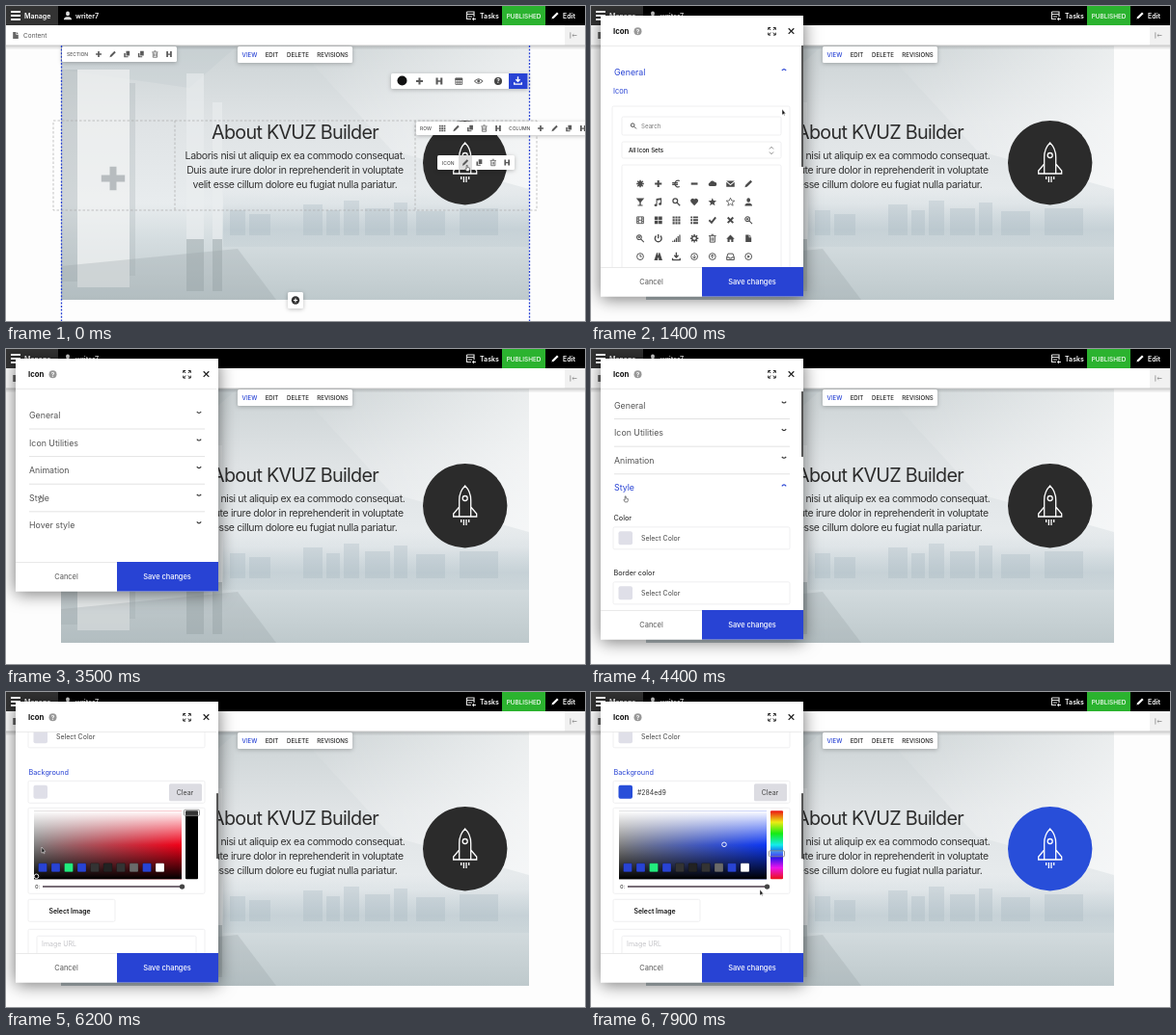
Animation, 600 px wide and 327 px high, one loop 8 s. Source, as an HTML page:

```html
<!DOCTYPE html>
<html lang="en">
<head>
<meta charset="utf-8">
<title>Icon settings</title>
<style>
  html, body { margin: 0; width: 100%; height: 100%; overflow: hidden; background: #fff; }
  #stage { display: block; width: 100vw; height: 100vh; font-family: Inter, "Liberation Sans", sans-serif; }
  #stage text { white-space: pre; }
  .bar { fill: #fff; filter: drop-shadow(0 1px 2px rgba(0,0,0,.25)); }
  .field { fill: #fff; stroke: #ebebed; stroke-width: .8; }
  #frame { fill: #fff; filter: drop-shadow(0 2px 9px rgba(0,0,0,.55)); }
</style>
</head>
<body>
<svg id="stage" viewBox="0 0 600 327" preserveAspectRatio="none"></svg>
<script>
const LOOP = 8000, BLUE = '#2843d4', PICKED = '#284ed9', DARK = '#2b2b2b', ROW = 28.6;

// ---- drawing helpers -------------------------------------------------
const rect = (x, y, w, h, fill, extra = '') =>
  `<rect x="${x}" y="${y}" width="${w}" height="${h}" fill="${fill}" ${extra}/>`;
const box = (x, y, w, h, cls) => `<rect class="${cls}" x="${x}" y="${y}" width="${w}" height="${h}" rx="1.5"/>`;
const text = (x, y, size, str, fill = '#333', extra = '') =>
  `<text x="${x}" y="${y}" font-size="${size}" fill="${fill}" ${extra}>${str}</text>`;
const line = (d, stroke, width = 1, extra = '') =>
  `<path d="${d}" fill="none" stroke="${stroke}" stroke-width="${width}" ${extra}/>`;
const ring = (x, y, r) => `M${x - r} ${y}a${r} ${r} 0 1 0 ${2 * r} 0a${r} ${r} 0 1 0 ${-2 * r} 0Z`;
const cells = (n, pitch, size) => Array.from({ length: n * n }, (_, i) =>
  `M${(i % n) * pitch - 4.5} ${Math.floor(i / n) * pitch - 4.5}h${size}v${size}h${-size}Z`).join('');
const MID = 'text-anchor="middle"', BOLD = 'font-weight="600"', MEDIUM = 'font-weight="500"';

// Icons in a 10 x 10 box around 0,0: "filled path|stroked path|stroke width"
const lens = ring(-1.3, -1.3, 2.8) + 'M1 1L4.5 4.5';
const star = 'M0-5L1.4-1.6 5-1.4 2.2.9 3.1 4.5 0 2.5-3.1 4.5-2.2.9-5-1.4-1.4-1.6Z';
const ICONS = {
  asterisk: '|M0-4.5V4.5M-4.5 0H4.5M-3.2-3.2L3.2 3.2M3.2-3.2L-3.2 3.2|1.9',
  plus: '|M0-4.2V4.2M-4.2 0H4.2|2.4',
  euro: '|M4-3.6A4 4 0 1 0 4 3.6M-5-1H2M-5 1H2|1.4',
  minus: '|M-4 0H4|2.6',
  cloud: 'M-3 3a2.3 2.3 0 0 1 0-4.5a3 3 0 0 1 5.5-.5a2.5 2.5 0 0 1 .5 5Z',
  mail: 'M-5-3.5H5L0 .5ZM-5-2.2L0 2 5-2.2V3.8H-5Z',
  pencil: 'M-4.5 4.5L-3.5 1.5 2.5-4.5 4.5-2.5-1.5 3.5Z',
  glass: 'M-5-4.5H5L.8 .5V3.5H3V4.8H-3V3.5H-.8V.5Z',
  music: 'M-2.5-4L4-5V2.5a1.8 1.5 0 1 1-1.2-1.4V-2.5L-1.3-1.8V4a1.8 1.5 0 1 1-1.2-1.4Z',
  search: `|${lens}|1.5`,
  heart: 'M0 4.5L-4.2 0A2.5 2.5 0 0 1 0-3A2.5 2.5 0 0 1 4.2 0Z',
  star,
  hollow: `|${star}|.9`,
  user: 'M-2.2-2.3a2.2 2.6 0 1 1 4.4 0a2.2 2.6 0 1 1-4.4 0M-4.5 4.8C-4.5 2-2 1.5 0 1.5S4.5 2 4.5 4.8Z',
  film: '|M-4-4H4V4H-4ZM-2-4V4M2-4V4M-2 0H2M-4-1.5H-2M-4 1.5H-2M2-1.5H4M2 1.5H4|1',
  large: cells(2, 5, 4.2),
  grid: cells(3, 3.4, 2.5),
  list: '|M-4.5-3.4H-2.4M-1.4-3.4H4.5M-4.5 0H-2.4M-1.4 0H4.5M-4.5 3.4H-2.4M-1.4 3.4H4.5|2.2',
  tasks: '|M-4.5-4H3V1M-4.5-4V3.5H0M-4-1.5H3M-3 1H1M2.5 2V5M1 3.5H5|1.2',
  ok: '|M-4 0L-1 3 4-3.5|2.3',
  cross: '|M-3.3-3.3L3.3 3.3M3.3-3.3L-3.3 3.3|2.3',
  zoomIn: `|${lens}M-2.8-1.3H.2M-1.3-2.8V.2|1.2`,
  power: '|M-2.5-3A4 4 0 1 0 2.5-3M0-5V0|1.6',
  signal: '|M-4.2 4.5V3M-2.1 4.5V1.4M0 4.5V-.5M2.1 4.5V-2.5M4.2 4.5V-4.5|1.4',
  cog: `|${ring(0, 0, 2.7)}M0-5V-3M0 5V3M-5 0H-3M5 0H3M-3.5-3.5L-2-2M3.5 3.5L2 2M-3.5 3.5L-2 2M3.5-3.5L2-2|1.7`,
  trash: '|M-3-2.5V4.6H3V-2.5M-4.5-3H4.5M-1.5-4.6H1.5M-1-1V3M1-1V3|1.1',
  home: 'M0-4.5L5 .5H3.5V4.5H1V1.5H-1V4.5H-3.5V.5H-5Z',
  file: 'M-3.5-4.5H.5V-1H3.5V4.5H-3.5ZM1.3-4.5L3.5-2H1.3Z',
  clock: `|${ring(0, 0, 4)}M0-2.5V0H2|1.1`,
  road: 'M-2-4.5H-.5V-2H.5V-4.5H2L5 4.5H.6V1.5H-.6V4.5H-5Z',
  download: '|M0-5V1M-2.5-1.5L0 1 2.5-1.5M-4.5 2V4.2H4.5V2|1.6',
  down: `|${ring(0, 0, 4)}M0-2.2V2M-1.8.4L0 2.2 1.8.4|1.1`,
  up: `|${ring(0, 0, 4)}M0 2.2V-2M-1.8-.4L0-2.2 1.8-.4|1.1`,
  inbox: '|M-4.5 1L-3-3.5H3L4.5 1V4H-4.5ZM-4.5 1H-1.5V2.2H1.5V1H4.5|1.1',
  play: `M-1.2-2L2 0-1.2 2Z|${ring(0, 0, 4)}|1.1`,
  copy: 'M-1-4.5H4.2V2.2H-1ZM-4.2-1.5H-2V3.2H2V4.6H-4.2Z',
  save: 'M-4-4.2H-1.5V-.8H1.5V-4.2H4V4.2H1.5V1H-1.5V4.2H-4Z',
  calendar: 'M-4.5-3.8H4.5V-1.2H-4.5Z|M-4-3.5H4V4H-4ZM-4 1.3H4M-1.3-1V4M1.3-1V4|1',
  eye: `${ring(0, 0, 1.7)}|M-5 0Q0-5.5 5 0Q0 5.5-5 0|1.2`,
  expand: '|M-4.2-1.5V-4.2H-1.5M-4-4L-1.4-1.4M1.5-4.2H4.2V-1.5M4-4L1.4-1.4M-4.2 1.5V4.2H-1.5M-4 4L-1.4 1.4M4.2 1.5V4.2H1.5M4 4L1.4 1.4|1.1',
  collapse: '|M-4.5-4.5V4.5M-1.5 0H5M.5-1.8L-1.5 0 .5 1.8|1.1',
};
const icon = (name, x, y, size = 8, color = '#4a4a4a') => {
  const [fill, stroke, width] = ICONS[name].split('|');
  return `<g transform="translate(${x} ${y}) scale(${size / 10})"><path d="${fill}" fill="${color}" fill-rule="evenodd"/>` +
    (stroke ? line(stroke, color, width) : '') + '</g>';
};
const icons = (names, x, y, step, size) =>
  names.split(' ').map((n, i) => icon(n, x + i * step, y, size, '#5a5a5a')).join('');
const help = (x, y, r, color) => `<circle cx="${x}" cy="${y}" r="${r}" fill="${color}"/>` +
  text(x, y + r * .6, r * 1.6, '?', '#fff', `${MID} font-weight="700"`);
const stops = list => list.map(([o, c, a = 1]) => `<stop offset="${o}" stop-color="${c}" stop-opacity="${a}"/>`).join('');
const gradient = (id, down, list) =>
  `<linearGradient id="${id}" x2="${down ? 0 : 1}" y2="${down ? 1 : 0}">${stops(list)}</linearGradient>`;

// ---- page ------------------------------------------------------------
const defs = `<defs>
  ${gradient('room', 1, [[0, '#ccd3d5'], [.3, '#dfe3e5'], [.62, '#e8ecee'], [.76, '#d5dde0'], [1, '#bec9cc']])}
  ${gradient('light', 0, [[0, '#fff', 0], [1, '#fff', .6]])}
  ${gradient('city', 1, [[0, '#a9bac3', 0], [.7, '#a9bac3', .4], [1, '#a9bac3', .15]])}
  ${gradient('shade', 1, [[0, '#000', .16], [1, '#000', 0]])}
  ${gradient('tint', 0, [[0, '#808080'], [1, '#f00']])}
  ${gradient('tone', 1, [[0, '#fff'], [.5, '#fff', 0], [.5, '#000', 0], [1, '#000']])}
  ${gradient('hues', 1, [0, 1, 2, 3, 4, 5, 6].map(i => [i / 6, `hsl(${i * 60} 85% 50%)`]))}
</defs>`;

const pillar = (x, y, w) => rect(x, y, w, 242 - y, '#eceff0', 'opacity=".6"') +
  rect(x, 242, w, 54, '#8f9b9f', 'opacity=".4"');
const photo = rect(57, 41, 485, 264, 'url(#room)') +
  '<path d="M300 41H542V190L400 150Z" fill="url(#light)"/>' +
  '<path d="M57 41H240L190 85 57 66Z" fill="#b9c3c6" opacity=".25"/>' +
  rect(225, 190, 317, 60, 'url(#city)') +
  [[232, 212, 16], [252, 216, 22], [308, 206, 20], [332, 212, 14], [350, 202, 16], [372, 210, 26], [402, 204, 14], [425, 213, 30], [470, 210, 40]]
    .map(([x, y, w]) => rect(x, y, w, 238 - y, '#a3b4bc', 'opacity=".3"')).join('') +
  rect(57, 66, 17, 220, '#a3adaf', 'opacity=".35"') + rect(74, 66, 54, 226, '#f1f3f3', 'opacity=".7"') +
  rect(128, 80, 6, 200, '#a3adaf', 'opacity=".3"') + pillar(187, 70, 18) + pillar(214, 100, 10) +
  '<path d="M57 270L240 252 280 305H57Z" fill="#929ea2" opacity=".28"/>';

const adminBar = rect(0, 0, 600, 20, '#000') + rect(0, 0, 54, 20, '#333') +
  line('M5 6H15M5 10H15M5 14H15', '#fff', 1.8) + text(19, 13, 7, 'Manage', '#fff', BOLD) +
  icon('user', 64, 10, 9, '#ddd') + text(72, 13, 7.1, 'writer7', '#fff', BOLD) +
  icon('tasks', 482, 10, 10, '#ddd') + text(491, 13, 7, 'Tasks', '#fff', BOLD) +
  rect(514, 0, 45, 20, '#2bb32f') + text(536.5, 12.5, 6.4, 'PUBLISHED', '#fff', MID + MEDIUM) +
  icon('pencil', 569, 10, 8, '#fff') + text(577, 13, 7, 'Edit', '#fff', BOLD) +
  rect(0, 20, 600, 21, '#fff') + rect(579, 20, 21, 21, '#f1f1f1') + rect(0, 40.5, 600, 1, '#c9c9c9') +
  rect(0, 41.5, 600, 4, 'url(#shade)') +
  icon('file', 10, 30.5, 8, '#666') + text(18, 33, 6.5, 'Content', '#555') + icon('collapse', 588, 30.5, 7, '#888');

const tabs = box(240, 42, 119, 17, 'bar') + [['VIEW', 252.5, BLUE], ['EDIT', 275.5], ['DELETE', 302.5], ['REVISIONS', 338.5]]
  .map(([s, x, c = '#222']) => text(x, 53, 6.1, s, c, MID + MEDIUM)).join('');

const article = text(299.5, 138, 19.8, 'About KVUZ Builder', '#2c2c2c', MID + ' letter-spacing="-.75"') +
  ['Laboris nisi ut aliquip ex ea commodo consequat.', 'Duis aute irure dolor in reprehenderit in voluptate',
    'velit esse cillum dolore eu fugiat nulla pariatur.']
    .map((s, i) => text(299.5, 158.5 + i * 15, 10.5, s, '#333', MID + ' letter-spacing="-.36"')).join('') +
  `<circle id="disc" cx="475.7" cy="162.7" r="43.7"/><g transform="translate(475.7 163)">` +
  line(`M0-21C-4-17-6-12-6-6V11H6V-6C6-12 4-17 0-21Z${ring(0, -8, 2.5)}M-6 1L-12 8V11H-6M6 1L12 8V11H6` +
    'M-4 14V17M-1.3 14V20M1.3 14V20M4 14V17', '#fff', 1.3) + '</g>';

const caption = (x, y, s) => text(x, y, 5, s, '#555', MEDIUM);
const editor = '<g id="editor">' +
  line('M57.5 41V327M542.5 41V327', BLUE, 1.3, 'stroke-dasharray="2 1.6"') +
  line('M49 119H550V212H49ZM175 119V212M424 119V212', '#aaa', .7, 'stroke-dasharray="2.5 2"') +
  icon('plus', 111, 179, 29, 'rgba(130,138,141,.5)') +
  box(58, 42, 119, 16, 'bar') + caption(63, 52, 'SECTION') + icons('plus pencil copy copy trash save', 96, 50, 14.6, 7) +
  box(399, 70, 142, 16, 'bar') + '<circle cx="410.5" cy="77.5" r="5" fill="#111"/>' +
  icons('plus save calendar eye', 428.5, 78, 20.4, 8.5) + help(510, 78, 4, '#444') +
  rect(521, 70, 19.5, 16, BLUE) + icon('download', 530.5, 77.5, 8.5, '#fff') +
  box(425, 120, 178, 14, 'bar') + caption(429, 129, 'ROW') + icons('grid pencil copy trash save', 452, 127, 14.5, 7) +
  caption(521, 129, 'COLUMN') + icons('plus pencil copy save', 554, 127, 14.6, 7) +
  box(447, 155, 80, 15, 'bar') + rect(469, 155, 14, 15, '#ddd') + caption(452, 164.5, 'ICON') +
  icons('pencil copy trash save', 476, 162.5, 14.4, 7) +
  box(292, 297, 16, 17, 'bar') + '<circle cx="300" cy="305.5" r="4.2" fill="#333"/>' + icon('plus', 300, 305.5, 5, '#fff') + '</g>';

// ---- settings dialog -------------------------------------------------
const clip = (id, y, body) => `<svg id="${id}" x="0" y="${y}" width="220" height="230">${body}</svg>`;
const GLYPHS = ('asterisk plus euro minus cloud mail pencil glass music search heart star hollow user film large grid list ok cross zoomIn ' +
  'zoomIn power signal cog trash home file clock road download down up inbox play').split(' ');

const generalPanel = text(23, 8, 7.4, 'Icon', BLUE, 'id="iconLabel"') +
  box(22, 21, 184, 205, 'field') + box(32, 32, 165, 19, 'field') + icon('search', 44, 41.5, 6.5) +
  text(52, 44, 6.2, 'Search', '#777') + box(32, 58, 165, 17, 'field') + text(39, 69, 6.1, 'All Icon Sets', '#111', MEDIUM) +
  line('M185 65.5L187 63.2 189 65.5M185 68.5L187 70.8 189 68.5', '#777', .8) + box(32, 82, 165, 135, 'field') +
  GLYPHS.map((n, i) => icon(n, 51 + (i % 7) * 18.7, 101.5 + Math.floor(i / 7) * 18.9, 8.5)).join('');

const colorField = (y, label, id) => text(23.5, y, 7.3, label, '#222', `id="${id}Label"`) + box(23, y + 6.5, 183, 23, 'field') +
  rect(28.5, y + 11, 14.5, 14, '#dfdfe8', `rx="2" id="${id}Swatch"`) + text(52, y + 21, 7, 'Select Color', '#444', `id="${id}Hint"`);

const PALETTE = [BLUE, BLUE, '#22ec7e', BLUE, '#333', '#222', '#333', '#6a6a6a', BLUE, '#fff'];
const picker = box(23, 3, 183, 89, 'field') + rect(29, 6, 153, 71, 'url(#tint)') + rect(29, 6, 153, 71, 'url(#tone)') +
  PALETTE.map((c, i) => rect(33.5 + i * 13.5, 60.5, 9, 9, c, 'rx="1" stroke="#0006" stroke-width=".5"')).join('') +
  '<circle id="knob" r="2.3" fill="none" stroke="#fff" stroke-width=".9"/>' +
  rect(186, 6, 13, 71, '#000', 'id="strip" rx="1"') +
  '<rect id="hueKnob" x="184.5" width="16" height="6" rx="1" fill="#fff3" stroke="#888" stroke-width=".9"/>' +
  text(30, 87, 6, 'o:', '#333') + line('M38 84.8H185', '#4a3b48', 1.5) + '<circle cx="182.5" cy="84.8" r="2.7" fill="#444"/>';

const stylePanel = colorField(20, 'Color', 'ink') + colorField(77, 'Border color', 'border') + colorField(134.5, 'Background', 'back') +
  '<g id="clear">' + rect(169, 144, 34, 18, '#dcdce2', 'rx="1.5"') + text(185.5, 155.5, 7, 'Clear', '#444', MID) +
  text(48, 155.5, 6.9, PICKED, '#333', 'id="code"') + '</g>' + clip('picker', 166, picker) +
  '<g id="below">' + box(23, 170, 90, 23, 'field') + text(44.5, 184.5, 6.9, 'Select Image', '#111', BOLD) +
  box(23, 201, 183, 30, 'field') + box(32, 208, 165, 19, 'field') + text(37, 218.5, 7, 'Image URL', '#c4c4c8') +
  text(23.5, 252, 7.3, 'Background style', '#222') + box(23, 258, 183, 23, 'field') + '</g>';

const PANELS = { 0: ['general', generalPanel], 3: ['style', stylePanel] };
const rows = ['General', 'Icon Utilities', 'Animation', 'Style', 'Hover style'].map((name, i) =>
  `<g id="row${i}">` + text(24, 31, 8.8, name, '#555', `id="title${i}"`) +
  line('M-2.2-1Q0 1.8 2.2-1', '#333', 1.2, `id="mark${i}"`) +
  (PANELS[i] ? clip(PANELS[i][0], 42, PANELS[i][1]) : '') +
  (i < 4 ? line('M24 0H206', '#dcdcdc', .8, `id="rule${i}"`) : '') + '</g>').join('');

const dialog = '<g id="dialog"><rect id="frame" x="10" y="10" width="210"/>' +
  clip('body', 41, `<g id="scroll">${rows}</g>`) + rect(218, 42, 2, 10, '#555', 'id="thumb"') +
  rect(10, 41, 208, .8, '#e8e8e8') + text(23, 29, 7.8, 'Icon', '#111', 'font-weight="700"') + help(48.5, 26.3, 4, '#999') +
  icon('expand', 187.5, 26.3, 9, '#222') + line('M204.7 23.3L210.3 28.9M210.3 23.3L204.7 28.9', '#222', 1.3) +
  '<g id="footer">' + rect(10, 0, 105, 30.5, '#fff') + rect(10, 0, 105, .8, '#e4e4e4') + rect(115, 0, 105, 30.5, BLUE) +
  text(62.5, 18.4, 7.5, 'Cancel', '#555', MID) + text(167, 18.4, 7.4, 'Save changes', '#fff', MID + MEDIUM) + '</g></g>';

const cursor = '<g id="cursor" stroke="#fff" stroke-width=".5" fill="#111"><path id="arrow" d="M0-3V3.2L1.4 2 2.2 3.8 3 3.4 2.2 1.7H3.8Z"/>' +
  '<path id="hand" d="M-.8-2.6H.2V-.5L2.3 0V1.8L1.7 3.4H-.8L-2.1 1.2-1.6.7-.8 1.3Z" fill="#fff" stroke="#333" stroke-width=".6"/></g>';

const stage = document.getElementById('stage');
stage.innerHTML = defs + rect(0, 0, 600, 327, '#fdfdfd') + photo + article + adminBar + tabs + editor + dialog + cursor;

// ---- motion ----------------------------------------------------------
const el = {};
stage.querySelectorAll('[id]').forEach(e => el[e.id] = e);
const set = (id, attrs) => { for (const k in attrs) el[id].setAttribute(k, attrs[k]); };
const show = (id, on) => { el[id].style.display = on ? '' : 'none'; };
const move = (id, x, y, extra = '') => set(id, { transform: `translate(${x} ${y})${extra}` });
const ramp = (t, a, b) => { const p = Math.min(1, Math.max(0, (t - a) / (b - a))); return p * p * (3 - 2 * p); };

const PATH = [[0, 478, 168], [600, 478, 168], [1300, 198, 110], [1500, 198, 110], [2000, 60, 116], [2200, 60, 70],
  [2950, 60, 70], [3450, 36, 155], [5400, 36, 156], [5650, 37, 170], [6000, 37, 170], [6200, 37, 164],
  [6300, 37, 164], [6550, 38, 187], [6900, 38, 187], [7800, 175, 208], [LOOP, 175, 208]];
const HAND = [[0, 600], [2100, 2950], [3400, 5400]];

function render(t) {
  const opened = ramp(t, 400, 600);
  const generalH = 240 * (1 - ramp(t, 2480, 2857));
  const styleH = 600 * ramp(t, 3600, 3950);
  const pickerH = 94 * ramp(t, 5750, 5950);
  const scroll = 148 * ramp(t, 4250, 5180) + 69.5 * ramp(t, 5900, 6170);
  const active = t >= 5750, picked = t >= 6700;

  show('editor', t < 400);
  show('dialog', opened > 0);
  set('dialog', { opacity: opened });

  const contentH = 180 + generalH + styleH, bodyH = Math.min(230, contentH);
  set('body', { height: bodyH });
  set('frame', { height: bodyH + 61.5 });
  move('footer', 0, 41 + bodyH);
  move('scroll', 0, -scroll);
  show('thumb', contentH > 231);
  set('thumb', { y: 41 + scroll * bodyH / contentH, height: bodyH * bodyH / contentH });

  const heights = [generalH, 0, 0, styleH, 0], isOpen = [t < 2480, false, false, t >= 3600, false];
  let y = 0;
  heights.forEach((h, i) => {
    move('row' + i, 0, y);
    set('title' + i, { fill: isOpen[i] ? BLUE : '#555' });
    set('mark' + i, { stroke: isOpen[i] ? BLUE : '#333' });
    move('mark' + i, 200, 25, isOpen[i] ? ' scale(1 -1)' : '');
    if (i < 4) move('rule' + i, 0, 42 + h);
    y += ROW + h;
  });
  set('general', { height: generalH });
  set('style', { height: styleH });
  set('iconLabel', { fill: isOpen[0] ? BLUE : '#222' });

  set('picker', { height: pickerH });
  move('below', 0, pickerH);
  show('clear', active);
  show('backHint', !active);
  show('code', picked);
  set('backLabel', { fill: active ? BLUE : '#222' });
  set('backSwatch', { fill: picked ? PICKED : '#dfdfe8' });
  el.tint.lastElementChild.setAttribute('stop-color', picked ? 'hsl(229 90% 50%)' : '#f00018');
  set('strip', { fill: picked ? 'url(#hues)' : '#000' });
  set('knob', { cx: picked ? 138 : 31.5, cy: picked ? 41 : 74 });
  set('hueKnob', { y: picked ? 47.5 : 5 });
  set('disc', { fill: picked ? PICKED : DARK });

  const k = Math.max(1, PATH.findIndex(p => p[0] > t));
  const [a, b] = [PATH[k - 1], PATH[k]], p = ramp(t, a[0], b[0]);
  move('cursor', a[1] + (b[1] - a[1]) * p, a[2] + (b[2] - a[2]) * p);
  const hand = HAND.some(([from, to]) => t >= from && t < to);
  show('hand', hand);
  show('arrow', !hand);
}

const start = performance.now();
function tick() {
  render((performance.now() - start) % LOOP);
  requestAnimationFrame(tick);
}
tick();
</script>
</body>
</html>
```
